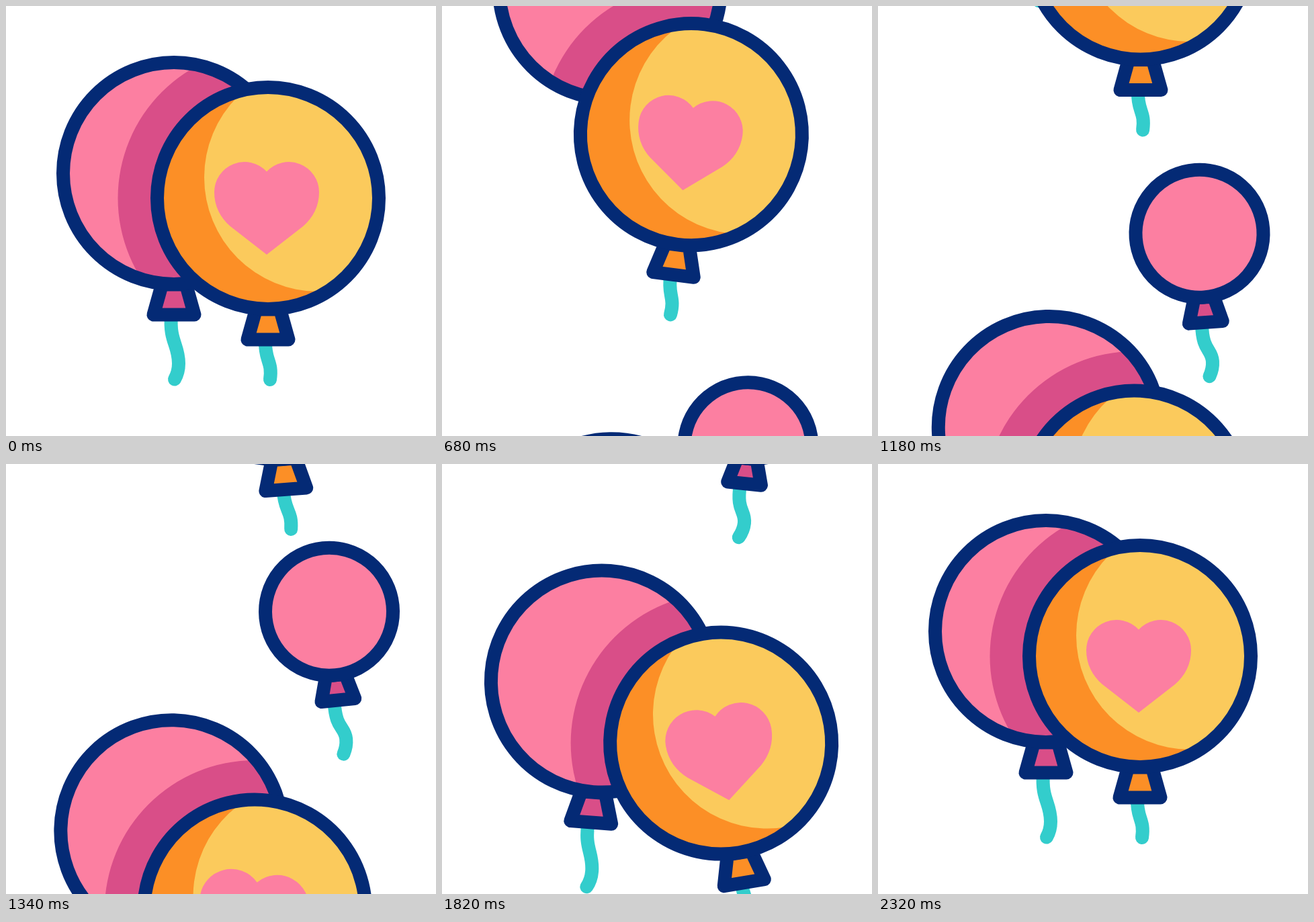
An HTML page with a canvas for the animation above (2400 ms loop, 640 by 640 pixels).

```html
<!DOCTYPE html>
<html lang="en">
<head>
<meta charset="utf-8">
<title>Balloons</title>
<style>
html, body { margin: 0; width: 100%; height: 100%; overflow: hidden; background: #fff; }
canvas { display: block; width: 100%; height: 100%; }
</style>
</head>
<body>
<canvas id="stage" width="640" height="640"></canvas>
<script>
const LOOP = 2400;
const NAVY = '#042a75', PINK = '#fc7fa1', ROSE = '#d94e88';
const ORANGE = '#fc8f26', YELLOW = '#fbca5c', TEAL = '#33cdcc';
const ctx = document.getElementById('stage').getContext('2d');

const knot = (top, base, y0, y1) => new Path2D(`M${-top} ${y0}L${-base} ${y1}H${base}L${top} ${y0}Z`);
const bigKnot = knot(17.9, 30.5, 165.5, 210.5);
const heart = new Path2D('M0-39.5A45 45 0 0 0-78-9C-78 12-69 29-54 42L0 84L54 42C69 29 78 12 78-9A45 45 0 0 0 0-39.5Z');

const kinds = {
  pink: {
    r: 165, fill: PINK, knotFill: ROSE, knot: bigKnot, x: 250, lean: 2.75,
    string: new Path2D('M-4 212C-7 250 7 255 7 283Q7 296 1 306.5')
  },
  gold: {
    r: 165, fill: ORANGE, knotFill: ORANGE, knot: bigKnot, x: 390, lean: 2.65,
    string: new Path2D('M-4 212C-5 243 7 242 3 270')
  },
  small: {
    r: 95, fill: PINK, knotFill: ROSE, knot: knot(14.5, 25, 95, 132.5), x: 472.6, lean: 1.46,
    string: new Path2D('M-6 135C-8 175 6 172 6 191Q6 202 0 213')
  }
};

// rise: height over time; sway: tilt in degrees, which also shifts the balloon sideways
const pairs = [
  {
    pink: { rise: [[100, 249], [1300, -330]], sway: [[100, 0], [400, -5], [960, 5], [1300, 0]] },
    gold: { rise: [[300, 286], [1800, -304]], sway: [[300, 0], [780, 8.1], [1500, -6], [1800, 0]] }
  },
  {
    pink: { rise: [[520, 824], [2200, 249]], sway: [[520, 0], [1000, -3.4], [1660, 5.6], [2200, 0]] },
    gold: {
      rise: [[800, 824], [2300, 286]],
      sway: [[800, 0], [950, -5], [1330, 7.5], [1830, -9.5], [2300, 0]],
      pulse: [[1000, 1], [1330, 1.045], [1660, 1], [1990, 1.045], [2320, 1]]
    }
  }
];
const single = {
  rise: [[290, 754], [2300, -246]],
  sway: [[290, 0], [720, 12], [1300, -6], [1800, 6], [2300, 0]]
};

function tween(keys, t) {
  if (t <= keys[0][0]) return keys[0][1];
  for (let i = 1; i < keys.length; i++) {
    const [t0, a] = keys[i - 1], [t1, b] = keys[i];
    if (t < t1) {
      const s = (t - t0) / (t1 - t0);
      return a + (b - a) * s * s * (3 - 2 * s);
    }
  }
  return keys[keys.length - 1][1];
}

function pose(kind, move, t) {
  const tilt = tween(move.sway, t);
  return {
    x: kind.x - kind.lean * tilt,
    y: tween(move.rise, t),
    angle: tilt * Math.PI / 180
  };
}

function disc(x, y, r, color) {
  ctx.beginPath();
  ctx.arc(x, y, r, 0, Math.PI * 2);
  ctx.fillStyle = color;
  ctx.fill();
}

function balloon(kind, p, decorate) {
  ctx.save();
  ctx.translate(p.x, p.y);
  ctx.rotate(p.angle);
  ctx.lineWidth = 20;
  ctx.lineCap = ctx.lineJoin = 'round';
  ctx.strokeStyle = TEAL;
  ctx.stroke(kind.string);
  ctx.strokeStyle = NAVY;
  ctx.fillStyle = kind.knotFill;
  ctx.fill(kind.knot);
  ctx.stroke(kind.knot);
  disc(0, 0, kind.r, kind.fill);
  if (decorate) {
    ctx.save();
    ctx.clip();
    decorate();
    ctx.restore();
  }
  ctx.beginPath();
  ctx.arc(0, 0, kind.r, 0, Math.PI * 2);
  ctx.stroke();
  ctx.restore();
}

function drawPair({ pink, gold }, t) {
  const back = pose(kinds.pink, pink, t);
  const front = pose(kinds.gold, gold, t);
  // the front balloon casts a round shade on the back one
  balloon(kinds.pink, back, () => {
    ctx.rotate(-back.angle);
    disc(front.x - back.x, front.y - back.y, 223.5, ROSE);
  });
  balloon(kinds.gold, front, () => {
    disc(75, -31, 170, YELLOW);
    const k = gold.pulse ? tween(gold.pulse, t) : 1;
    ctx.translate(-2, 15);
    ctx.scale(k, k);
    ctx.translate(0, -15);
    ctx.fillStyle = PINK;
    ctx.fill(heart);
  });
}

function draw(now) {
  const t = now % LOOP;
  ctx.fillStyle = '#fff';
  ctx.fillRect(0, 0, 640, 640);
  balloon(kinds.small, pose(kinds.small, single, t));
  pairs.forEach(pair => drawPair(pair, t));
}

const start = performance.now();
function tick(now) {
  draw(Math.max(0, now - start));
  requestAnimationFrame(tick);
}
draw(0);
requestAnimationFrame(tick);
</script>
</body>
</html>
```
